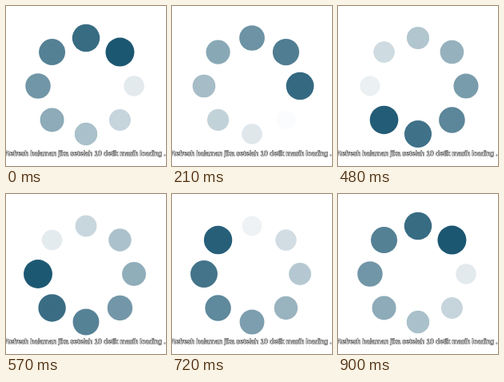
Animation, 200 px wide and 200 px high, one loop 0.93 s. Source, as an HTML page:

```html
<!DOCTYPE html>
<html lang="id">
<head>
<meta charset="utf-8">
<title>Loading</title>
<style>
  html, body { margin: 0; width: 100%; height: 100%; overflow: hidden; background: #fff; }
  svg { display: block; width: 100vw; height: 100vh; }
  circle { fill: #1c5772; }
  text {
    font: 8.5px "Liberation Sans", Arial, sans-serif;
    fill: #fff;
    stroke: #3c3c3c;
    stroke-width: 1px;
    stroke-linejoin: round;
    paint-order: stroke;
    text-rendering: geometricPrecision;
  }
</style>
</head>
<body>
<svg viewBox="0 0 200 200">
  <g id="dots"></g>
  <text x="-1.6" y="187">Refresh halaman jika setelah 10 detik masih loading ...</text>
</svg>
<script>
  const COUNT = 8, RING = 60, RADIUS = 12;
  const STEP = 30, STEPS = 30; // the closing pose repeats the opening one
  const group = document.getElementById('dots');

  const dots = Array.from({ length: COUNT }, (_, i) => {
    const dot = document.createElementNS('http://www.w3.org/2000/svg', 'circle');
    const angle = (i - 1) * Math.PI / 4;
    dot.setAttribute('cx', 100 + RING * Math.cos(angle));
    dot.setAttribute('cy', 100 + RING * Math.sin(angle));
    return group.appendChild(dot);
  });

  function draw(time) {
    const phase = Math.floor(time / STEP) % (STEPS + 1) / STEPS;
    dots.forEach((dot, i) => {
      const age = (phase - i / COUNT + 1) % 1;
      dot.setAttribute('r', RADIUS * (1.5 - age / 2));
      dot.setAttribute('opacity', 1 - age);
    });
  }

  const start = performance.now();
  function tick() {
    draw(performance.now() - start);
    requestAnimationFrame(tick);
  }
  tick();
</script>
</body>
</html>
```
